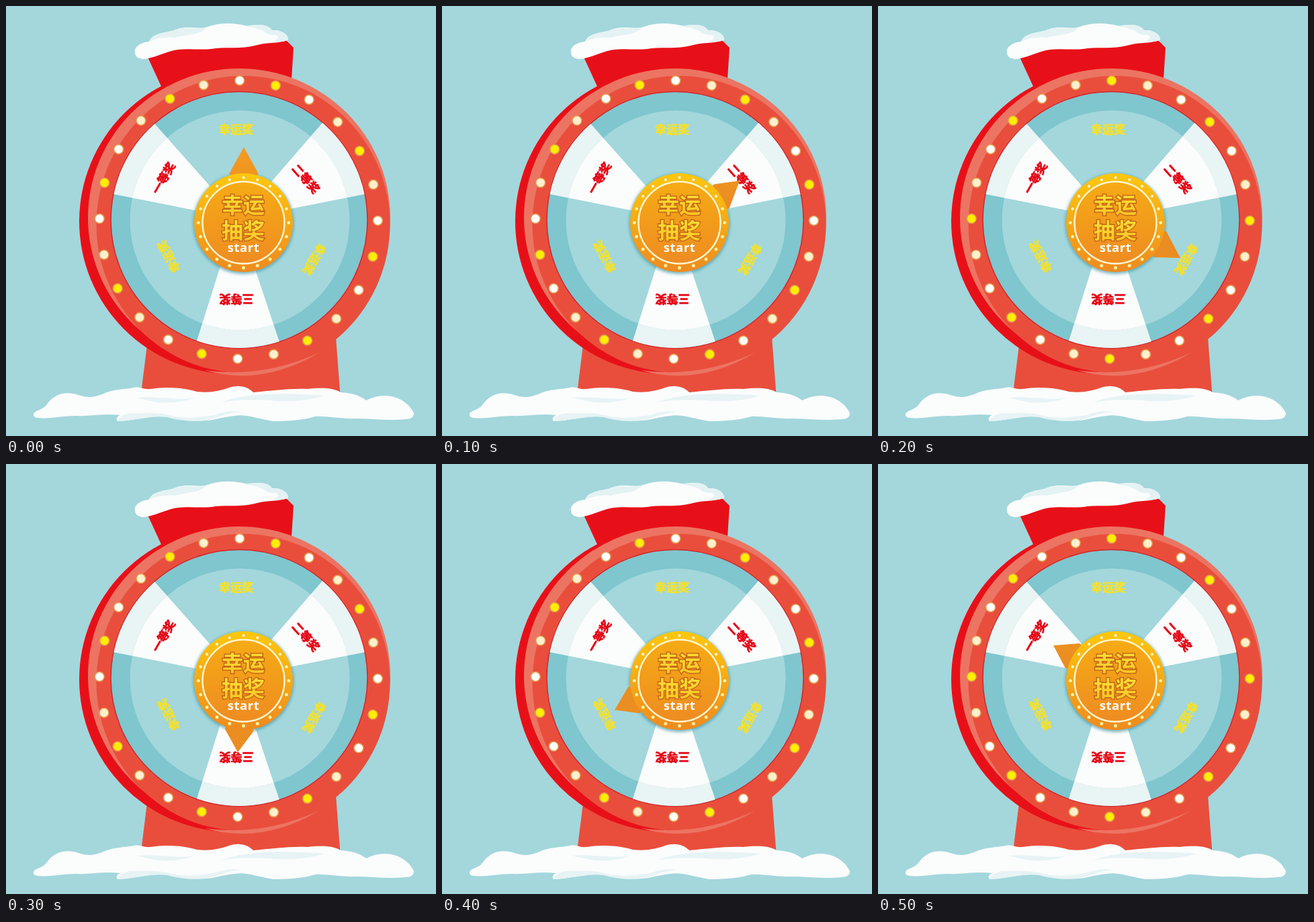
These frames come from a looping animation (640 by 640 pixels, 0.6 s). An HTML page:

```html
<!DOCTYPE html>
<html lang="zh">
<head>
<meta charset="utf-8">
<title>幸运抽奖</title>
<style>
html, body { margin: 0; height: 100%; overflow: hidden; background: #a3d7dc; }
svg { display: block; width: 100%; height: 100%; }
text { font-family: "Noto Sans CJK SC", "Noto Sans CJK", sans-serif; font-weight: 900; text-anchor: middle; }
#prizes text { font-size: 17px; stroke-width: .7; }
.win { fill: #e50012; stroke: #e50012; }
.luck { fill: #f5e12c; stroke: #f5e12c; }
#hub .big { font-size: 32px; fill: url(#gold); stroke: #c4641a; stroke-width: 2.8; paint-order: stroke; }
#hub .start { font: bold 18.5px "Open Sans", "Noto Sans", sans-serif; letter-spacing: .5px; fill: #fff; }
</style>
</head>
<body>
<svg viewBox="0 0 640 640">
  <defs>
    <linearGradient id="orange" x1="0" y1="0" x2="0" y2="1">
      <stop offset="0" stop-color="#fdc80c"/><stop offset="1" stop-color="#ee8a20"/>
    </linearGradient>
    <linearGradient id="disc" x1="0" y1="0" x2="0" y2="1">
      <stop offset="0" stop-color="#f6ab14"/><stop offset="1" stop-color="#ee8c22"/>
    </linearGradient>
    <linearGradient id="gold" x1="0" y1="0" x2="0" y2="1">
      <stop offset="0" stop-color="#fde636"/><stop offset="1" stop-color="#f9c222"/>
    </linearGradient>
    <linearGradient id="arrow" gradientUnits="userSpaceOnUse" x1="0" y1="211" x2="0" y2="290">
      <stop offset="0" stop-color="#f59c20"/><stop offset="1" stop-color="#ea8d22"/>
    </linearGradient>
    <filter id="blur" x="-20%" y="-20%" width="140%" height="140%"><feGaussianBlur stdDeviation="2"/></filter>
    <clipPath id="face"><circle cx="347" cy="318.5" r="190.5"/></clipPath>
    <clipPath id="inner"><circle cx="348" cy="319" r="163.5"/></clipPath>
    <path id="slices" d="M347 317L198 149L124 273Z M347 317L496 145L570 273Z M343.5 310L273 533L418 533Z"/>
  </defs>

  <!-- stand and cap -->
  <path fill="#e94e3c" d="M213 480L200 585H498L490 480Z"/>
  <path fill="#e81018" d="M210 74L233 124L330 112L425 108L428 62L416 50L300 50Z"/>
  <path fill="#fbfcfc" d="M192 70C190 60 202 54 213 53C217 42 232 40 248 37C268 27 286 36 300 31C320 23 345 26 360 30C376 26 391 28 396 36C408 35 421 42 420 51C403 56 387 54 370 59C350 64 330 61 312 63C290 67 269 61 246 67C229 72 215 79 203 79Q192 77 192 70Z"/>
  <path fill="#e4f2f3" d="M213 53C220 41 234 41 250 36C267 29 287 37 300 31C286 45 270 41 252 47Q232 45 213 53Z
    M356 30C376 26 391 28 396 36C409 35 421 42 420 51Q410 54 398 53Q410 47 402 43Q388 44 383 37Q372 32 356 30Z"/>

  <!-- rim -->
  <ellipse cx="336.5" cy="320.5" rx="227.5" ry="227" fill="#e81018"/>
  <ellipse cx="347" cy="315" rx="225" ry="222" fill="#ec7462"/>
  <ellipse cx="353" cy="325" rx="218.5" ry="221" fill="#e94e3c"/>
  <path d="M296 542Q380 567 466 516Q380 555 296 542Z" fill="#ec7462"/>
  <g id="bulbs" stroke="#e59a4c" stroke-width="1.6"></g>

  <!-- face -->
  <circle cx="347" cy="318.5" r="191" fill="#7fc6ce" stroke="#d3262b" stroke-width="1.5"/>
  <use href="#slices" fill="#e9f4f4" clip-path="url(#face)"/>
  <g clip-path="url(#inner)">
    <circle cx="348" cy="319" r="164" fill="#a3d7dc"/>
    <use href="#slices" fill="#fbfcfc"/>
  </g>
  <g id="prizes"></g>

  <!-- hub -->
  <circle cx="353.5" cy="324" r="75" fill="#4f9fae" opacity=".75" filter="url(#blur)"/>
  <path id="pointer" fill="url(#arrow)"/>
  <g id="hub">
    <circle cx="353.5" cy="322.5" r="73.5" fill="url(#orange)"/>
    <circle cx="353.5" cy="322.5" r="61" fill="url(#disc)" stroke="#fff6d2" stroke-width="2.4"/>
    <g id="studs" fill="#fff6b0" stroke="#eda21d" stroke-width=".6"></g>
    <text class="big" x="353" y="308">幸运</text>
    <text class="big" x="353" y="346">抽奖</text>
    <text class="start" x="353.5" y="366">start</text>
  </g>

  <!-- ground snow -->
  <path fill="#fbfcfc" d="M41 609C40 602 54 602 60 594C72 576 90 573 108 579C122 584 132 582 143 578C158 570 176 571 190 568C200 566 203 571 215 570C238 566 262 568 284 574C304 576 318 573 332 568C348 563 360 567 368 575C394 573 420 569 448 570C470 568 486 568 498 575C514 576 526 579 536 587C550 580 564 578 578 582C594 587 602 596 607 606Q607 615 594 615C570 618 545 614 520 614C500 615 480 610 460 611C440 617 418 618 398 618C376 615 358 607 340 610C318 612 306 619 284 617C262 619 246 609 226 611C206 612 190 617 166 618Q162 613 170 609C146 606 126 611 104 610C84 610 64 615 47 613Q41 612 41 609Z"/>
  <path fill="#e7f3f4" d="M166 618Q170 608 184 606C206 606 226 604 246 610C266 615 290 612 310 609Q330 601 350 604Q330 606 312 613C292 621 262 618 240 612C216 609 196 616 166 618Z
    M320 590C350 578 400 574 474 580Q440 590 404 588Q356 583 320 590Z
    M194 583C222 580 254 588 282 583Q250 594 220 589Z"/>
</svg>
<script>
const NS = "http://www.w3.org/2000/svg";
const $ = id => document.getElementById(id);

function add(parent, tag, attrs) {
  const el = document.createElementNS(NS, tag);
  for (const k in attrs) el.setAttribute(k, attrs[k]);
  return $(parent).appendChild(el);
}

// Clockwise from twelve o'clock.
function polar(cx, cy, r, deg) {
  const a = deg * Math.PI / 180;
  return [cx + r * Math.sin(a), cy - r * Math.cos(a)];
}

const bulbs = Array.from({ length: 24 }, (_, i) => {
  const [cx, cy] = polar(346.3, 318, 207.1, i * 15 + .4);
  return add("bulbs", "circle", { cx, cy, r: 7 });
});

for (let i = 0; i < 20; i++) {
  const [cx, cy] = polar(353.5, 322.5, 67.2, i * 18);
  add("studs", "circle", { cx, cy, r: 2.6 });
}

for (const [label, x, y, turn] of [
  ["幸运奖", 342.5, 183.5, 0], ["二等奖", 446.5, 257, 48], ["幸运奖", 459, 377, 120],
  ["三等奖", 343, 436, 180], ["幸运奖", 242, 373, 242], ["一等奖", 234, 256, -60]
]) {
  add("prizes", "text", {
    class: label[0] === "幸" ? "luck" : "win",
    y: 6.5,
    transform: `translate(${x} ${y}) rotate(${turn})`
  }).textContent = label;
}

// Tip position and the direction of the arrow's foot, one per step.
const poses = [
  [354, 210, .5], [443, 260, 58], [450, 375, 116],
  [345, 429, 185], [257, 366, 247], [261, 270, 300]
];

function draw() {
  const step = Math.floor(performance.now() / 100) % poses.length;
  const [x, y, dir] = poses[step];
  const foot = side => polar(353.5, 322.5, 77, dir + side * 16);
  $("pointer").setAttribute("d", `M${x} ${y}L${foot(-1)}L353.5 322.5L${foot(1)}Z`);
  bulbs.forEach((b, i) => {
    const lit = i % 3 === (step + 1) % 3;
    b.setAttribute("fill", lit ? "#ffee00" : i % 2 ? "#fdf0cd" : "#fffefa");
  });
  requestAnimationFrame(draw);
}
draw();
</script>
</body>
</html>
```
